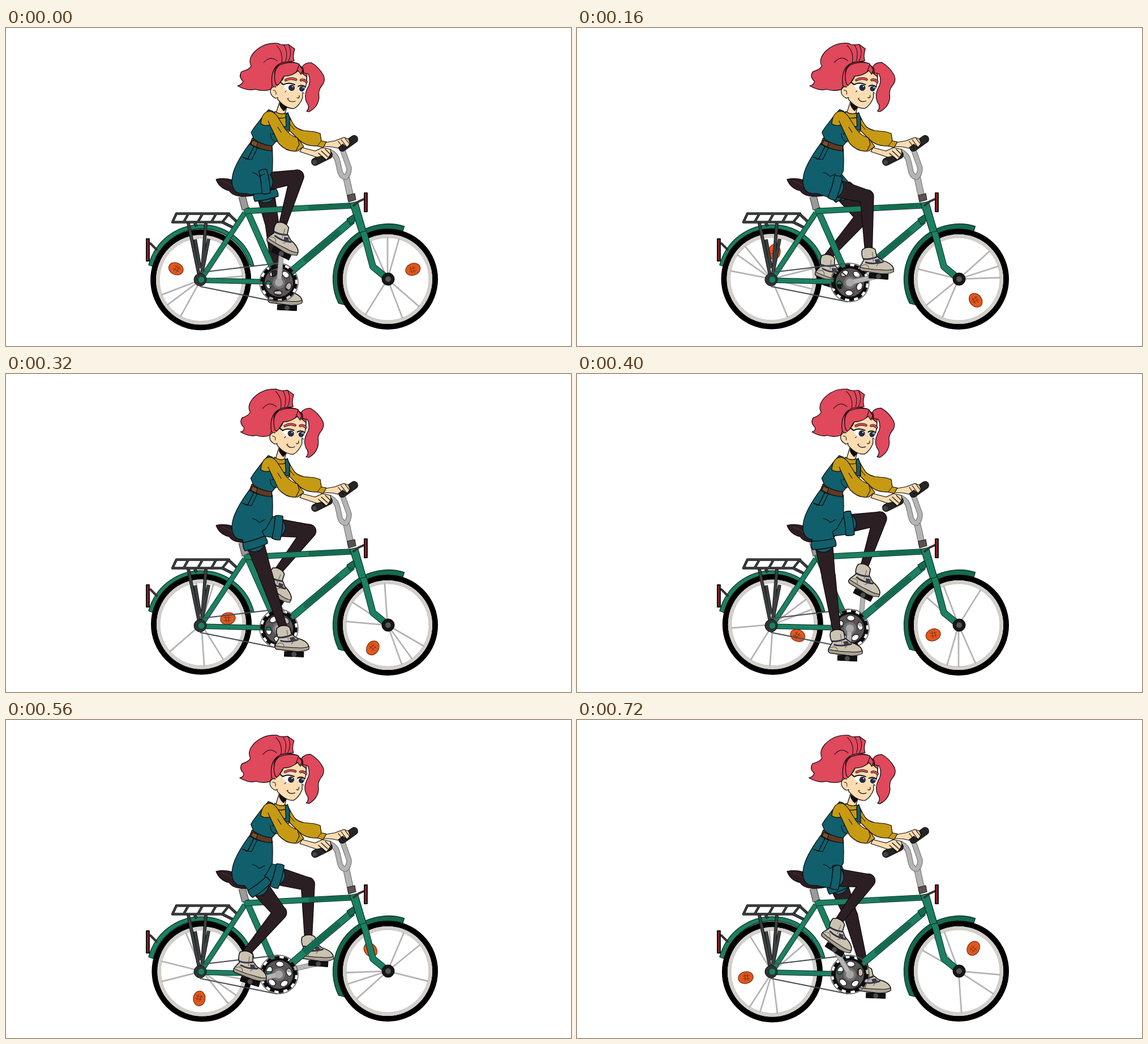
These frames come from a looping animation (998 by 561 pixels, 800 ms). An HTML page with a canvas:

```html
<!DOCTYPE html>
<html lang="en">
<head>
<meta charset="utf-8">
<title>Bike ride</title>
<style>
html, body { margin: 0; width: 100%; height: 100%; overflow: hidden; background: #fff; }
canvas { display: block; width: 100%; height: 100%; }
</style>
</head>
<body>
<canvas id="stage"></canvas>
<script>
const W = 998, H = 561, STEP = 80, STEPS = 10, TAU = Math.PI * 2;
const canvas = document.getElementById('stage');
const g = canvas.getContext('2d');
const INK = '#0c0a0b', GREEN = '#1c8062', DEEP = '#146a50', EDGE = '#0a3024';
const TEAL = '#115f6c', GOLD = '#c79a14', SKIN = '#fcdcb0', HAIR = '#e0485c';
const LEG = '#2b1f24', STEEL = '#b5b4b5', RACK = '#3c4041', SHOE = '#cbc3b1';

// Foot tilt in degrees for each step of the pedal turn
const TILT = [27, 12, 4, 2, 2, 3, 8, 17, 26, 33];
const SPOKES = [-114, -90, -74, 41, 69, 122];

const rad = d => d * Math.PI / 180;
const polar = (x, y, r, d) => [x + r * Math.cos(rad(d)), y + r * Math.sin(rad(d))];

function shape(d, fill, stroke = INK, w = 1.2) {
  const p = typeof d === 'string' ? new Path2D(d) : d;
  if (fill) { g.fillStyle = fill; g.fill(p, 'evenodd'); }
  if (stroke) { g.strokeStyle = stroke; g.lineWidth = w; g.stroke(p); }
}
const line = (d, color = INK, w = 1.2) => shape(d, null, color, w);

// A stroke with a thin outline on both sides
function tube(d, color, w, edge = EDGE, cap = 'butt') {
  g.lineCap = cap;
  line(d, edge, w + 1);
  line(d, color, w - 1);
  g.lineCap = 'round';
}

function disc(x, y, r, fill, stroke = null, w = 1) {
  const p = new Path2D();
  p.arc(x, y, r, 0, TAU);
  shape(p, fill, stroke, w);
}

function at(x, y, deg, draw) {
  g.save();
  g.translate(x, y);
  g.rotate(rad(deg));
  draw();
  g.restore();
}

// Outline all parts first, then fill, so they read as one form
function merge(parts, fill) {
  parts.forEach(p => shape(p, null, INK, 2.4));
  parts.forEach(p => shape(p, fill, null));
}

function limb([x1, y1], [x2, y2], r1, r2) {
  const a = Math.atan2(y2 - y1, x2 - x1), p = new Path2D();
  p.arc(x1, y1, r1, a + Math.PI / 2, a - Math.PI / 2);
  p.arc(x2, y2, r2, a - Math.PI / 2, a + Math.PI / 2);
  p.closePath();
  return p;
}

function wheel(x, y, spin, glow) {
  disc(x, y, 84, null, '#000', 10);
  disc(x, y, 76, null, '#d3cfcb', 6);
  disc(x, y, 73, null, '#bdb9b6', 0.8);
  at(x, y, spin, () => {
    SPOKES.forEach(a => at(0, 0, a, () => line('M8 0H73', '#b4b3b4', 2.7)));
    at(0, 0, glow, () => {
      const p = new Path2D();
      p.ellipse(48, 0, 13.2, 10.4, 0, 0, TAU);
      shape(p, '#e2571d', '#7c3212', 1.2);
      line('M42 -3L53 -1M41 2L52 4M45 -6L44 6M50 -5L48 7', '#6b3218', 0.9);
    });
  });
}

function pedal(x, y, tilt) {
  at(x, y, tilt, () => {
    shape('M-17 -4H17V5H-17Z', '#111', '#000', 1);
    disc(0, 1, 4.5, '#4b4949');
  });
}

function shoe(x, y, tilt) {
  at(x, y, tilt, () => {
    shape('M-32 -44L-26 -48Q-16 -51 -9 -46L-6 -35L4 -28Q21 -24 25 -16L26 -10Q17 -4 5 -4L-31 -7Q-36 -9 -33 -16L-28 -26Q-34 -35 -32 -44Z', SHOE, INK, 1.5);
    shape('M-34 -13Q-15 -10 3 -11Q18 -10 26 -14L26 -9Q17 -4 5 -4L-31 -7Q-35 -9 -34 -13Z', '#aaa194', INK, 1);
    line('M-28 -28Q-19 -27 -6 -33M-24 -22Q-10 -19 6 -25', '#2d3047', 2.8);
    line('M-14 -41L-11 -25M2 -27L-5 -17M-31 -16Q-20 -22 -18 -12', '#5b554f', 1);
    shape('M-9 -28L-1 -30L2 -24L-6 -22Z', '#3b3b48', null);
  });
}

function crank(cx, cy, deg, tilt) {
  const [x, y] = polar(cx, cy, 52, deg);
  tube(`M${cx} ${cy}L${x} ${y}`, STEEL, 8, '#8a898a', 'round');
  pedal(x, y, tilt);
  return [x, y];
}

function pose(hip, [px, py], tilt) {
  const a = rad(tilt), c = Math.cos(a), s = Math.sin(a), thigh = 89, shin = 91;
  const foot = [px - 21 * c + 46 * s, py - 21 * s - 46 * c];
  const dx = foot[0] - hip[0], dy = foot[1] - hip[1];
  const d = Math.min(Math.hypot(dx, dy), thigh + shin);
  const bend = Math.acos((thigh * thigh + d * d - shin * shin) / (2 * thigh * d));
  const turn = (Math.atan2(dy, dx) - bend) * 180 / Math.PI;
  return { hip, foot, turn, knee: polar(...hip, thigh - 6, turn) };
}

function leg(p, pedalAt, tilt) {
  merge([limb(p.hip, p.knee, 17, 11), limb(p.knee, p.foot, 11.5, 6)], LEG);
  shoe(...pedalAt, tilt);
}

function cuff(p, reach) {
  at(...polar(...p.hip, reach, p.turn), p.turn, () =>
    shape('M-7 -20Q0 -23 7 -21Q10 0 7 21Q0 23 -8 20Q-5 0 -7 -20Z', TEAL, INK, 1.4));
}

function rack() {
  tube('M322 344L341 436M353 344L346 436M334 373L343 424M358 372L347 428', RACK, 5, '#151717');
  tube('M301 327.5H394L382 342.5H294ZM322 328L314 342M347 328L339 342M371 328L363 342', RACK, 3.4, '#151717');
  tube('M393 328L408 342M381 342L405 354M333 344L337 350', RACK, 4, '#151717');
  line('M255 380L266 391', '#333', 4);
  shape('M248 372H253V411H248Z', '#861d20', '#151010', 2);
}

function fenders() {
  shape('M252 418A96 96 0 0 1 438 420L430 418A88 88 0 0 0 260 421Z', GREEN, EDGE, 1.3);
  const p = new Path2D();
  p.arc(675, 443, 97.5, rad(154), rad(287));
  p.arc(675, 443, 87, rad(287), rad(148), true);
  p.closePath();
  shape(p, DEEP, EDGE, 1.3);
}

function frame() {
  tube('M417 297L423 320', '#9b9999', 12, '#333');
  tube('M612 339L500 433', GREEN, 12);
  line('M586 361L530 408', DEEP, 9);
  tube('M422 326L344 444', GREEN, 8.5);
  tube('M343 445L470 448', GREEN, 8.5);
  tube('M424 318L472 426', GREEN, 10.5);
  tube('M424 323L616 313', GREEN, 9.5);
  line('M538 317L606 313', DEEP, 7.5);
  tube('M618 322L634 368L648 421L675 443', GREEN, 11);
  shape('M607 309L621 306L636 358L624 361Z', GREEN, EDGE);
  shape('M602 337L614 329L617 340L608 347Z', DEEP, EDGE);
  disc(675, 443, 11, '#161616', '#000');
  disc(675, 443, 5, '#555');
  disc(343, 444, 11, '#303434', '#111');
  disc(345, 444, 6, GREEN, EDGE);
}

function chainring(turn) {
  line('M345 431L480 415M343 456L478 483', '#464b54', 2);
  at(482, 449, turn, () => {
    const p = new Path2D();
    p.arc(0, 0, 27, 0, TAU);
    for (let i = 0; i < 5; i++) {
      const a = 36 + 72 * i, [x, y] = polar(0, 0, 18.5, a);
      p.moveTo(...polar(x, y, 4.8, a));
      p.ellipse(x, y, 4.8, 7, rad(a), 0, TAU);
    }
    shape(p, '#595455', '#151313', 1.2);
    disc(0, 0, 27, null, '#111', 4);
    g.lineCap = 'butt';
    g.setLineDash([8.2, 7]);
    disc(0, 0, 29.3, null, '#0c0c0c', 7);
    g.setLineDash([]);
    g.lineCap = 'round';
  });
  disc(482, 449, 34, null, '#55575c', 1.3);
  disc(482, 449, 11, '#777374');
}

function saddle() {
  shape('M371 267Q384 264 400 268Q433 270 457 279L455 287Q444 298 414 297Q400 296 394 287Q377 283 371 267Z', '#2d1d23');
  line('M382 270Q400 275 406 288', '#54383d', 1);
}

function handlebar() {
  tube('M610 304L600 259', STEEL, 11, '#6d6c6d');
  const fork = 'M572 218Q584 224 586 236L590 254Q593 263 600 263M592 208L606 247Q606 258 600 263';
  tube(fork, STEEL, 8.5, '#6d6c6d', 'round');
  shape('M603 295L616 292L618 303L605 307Z', '#5b514d', '#2a2422');
  line('M632 302L623 306L614 313', '#333', 4);
  shape('M633 291H638V324H633Z', '#8d1b22', '#171011', 2);
  tube('M546 236L570 224M594 211L615 196', '#252525', 13, '#0b0b0b', 'round');
  disc(545, 237, 4, '#444');
}

function torso() {
  shape('M484 128L477 150Q487 155 493 150L497 136Z', SKIN);
  shape('M484 130Q490 139 498 138L491 147Q486 143 483 136Z', INK, null);
  shape('M463 147L475 149Q485 154 498 151L504 163L500 183L474 186L456 172Z', GOLD);
  shape('M475 147Q485 154 495 150L494 158Q482 161 473 156Z', GOLD);
  shape('M452 158L438 176L433 184L437 194L431 205Q450 217 470 215L470 208L485 191L488 180L501 180L502 162L498 149L494 153L495 174L468 173L472 147L464 144Z', TEAL);
  line('M467 186Q468 201 480 201L487 190M470 187L486 182', INK, 1);
  shape('M435 194L431 204Q450 216 470 217L470 208Q450 206 435 194Z', '#5e3a24');
  shape('M436 198L445 202L442 210L433 205Z', '#7a5030', INK, 1);
  line('M438 209L427 231L418 228M444 212L434 232L423 231', INK, 1.1);
}

function arms() {
  shape('M564 202L581 199L597 193L605 196L608 204L602 211L595 205L586 212L577 210L561 209Z', SKIN);
  line('M592 197L602 210M587 200L596 212M599 195L607 205', INK, 1.2);
  shape('M501 159L510 173Q516 179 526 181L545 183L555 186L557 199L566 201L560 211L549 208Q529 209 517 197L501 181Z', GOLD);
  line('M500 168L509 179M557 199L550 208', INK, 1);
  shape('M523 211L546 217L559 211L573 214L574 222L566 233L558 226L549 228L519 218Z', SKIN);
  line('M557 217L568 227M552 221L565 233M564 214L573 223', INK, 1.2);
  shape('M466 147Q452 147 450 169Q458 174 466 171L482 204Q497 220 515 217L526 209L515 194Q502 190 493 178L480 157Q473 147 466 147Z', GOLD);
  line('M515 194L518 205L512 217M466 171L463 164M480 175L486 184', INK, 1.1);
}

function hair(s) {
  const t = 7.5 * s, u = 3 * s;
  shape(`M509 58Q506 50 510 37L499 29Q486 31 480 27Q455 25 438 43Q427 56 433 67Q431 73 ${416 + u} 77Q${410 + u} 86 ${419 + u} 94Q${416 + t} 101 ${409 + t} 102Q${427 + t} 112 ${440 + u} 108Q456 113 468 108Q473 96 471 82Q477 65 489 61Z`, HAIR);
  line('M494 58Q499 43 491 30M487 61Q490 42 478 31M499 58Q506 45 500 31M479 58Q467 47 455 61', INK, 1);
}

function head(s) {
  hair(s);
  shape('M470 101Q467 77 479 66Q493 55 514 62L532 77L531 98L474 106Z', HAIR);
  shape('M480 106Q471 100 467 110Q466 119 476 124L484 122Z', SKIN);
  shape('M479 99Q489 94 491 85Q506 83 517 75L531 86Q532 104 524 112L524 123Q519 136 509 142Q494 143 480 126Z', SKIN);
  shape('M477 103L485 101L488 122L478 122Z', SKIN, null);
  line('M472 110Q478 109 477 117', INK, 1);
  shape('M475 93Q472 73 484 65Q502 58 517 63L524 74L521 82L516 75Q506 85 491 85L483 98Q477 105 475 93Z', HAIR);
  line('M475 82Q473 71 482 65M513 78L518 64', INK, 1.1);
  // Eyes, brows, nose and smile
  shape('M489 100Q499 95 510 100Q513 111 503 112Q493 111 489 100Z', '#fff', null);
  shape('M516 103Q522 99 528 103Q528 113 522 114Q516 113 516 103Z', '#fff', null);
  disc(504.5, 105.5, 5.6, '#282a3d');
  disc(522.5, 107.5, 4.7, '#282a3d');
  disc(506.5, 103.5, 1.1, '#fff');
  disc(524.5, 105.5, 1, '#fff');
  line('M485 96L490 100Q499 95 510 100M516 103Q522 99 529 104', INK, 2);
  line('M495 111L493 113M525 114L527 116', INK, 1);
  line('M494 92Q503 87 512 91M521 92Q526 90 531 95', INK, 4.4);
  line('M494 92Q503 87 512 91M521 92Q526 90 531 95', HAIR, 2.8);
  line('M514 123Q519 125 518 119M498 126Q502 132 511 129M497 125L499 124', INK, 1.2);
  shape(`M523 69Q527 61 539 61Q553 69 561 84Q565 94 557 103Q551 110 553 122Q552 139 ${535 + s} 148L531 147Q538 140 531 131Q526 120 532 107Q540 95 534 81L525 79Z`, HAIR);
  line('M523 69Q527 72 525 81', INK, 1.1);
}

function paint(k) {
  const turn = -85 + 36 * k, sway = (1 - Math.cos(rad(36 * k))) / 2;
  const tilt = TILT[k], farTilt = TILT[(k + 5) % STEPS];
  const wob = 36 * (k - 6.5);
  g.lineCap = g.lineJoin = 'round';

  fenders();
  wheel(...polar(345, 443, 1.5, wob), 233 + 36 * k, -29);
  wheel(674, 443, 36 * k, -21);

  const farPedal = crank(501, 441, turn + 180, farTilt);
  const far = pose([453, 268], farPedal, farTilt);
  leg(far, farPedal, farTilt);

  rack();
  frame();
  chainring(turn);
  saddle();
  merge([limb(far.hip, polar(...far.hip, 22, far.turn), 17, 18)], TEAL);
  cuff(far, 27);

  const nearPedal = crank(482, 449, turn, tilt);
  disc(482, 449, 7, '#a9a7a8');
  const near = pose([432, 275], nearPedal, tilt);
  leg(near, nearPedal, tilt);

  const body = new Path2D('M431 204Q402 243 400 265Q398 283 409 290Q420 293 434 290L459 272L470 252Q471 233 470 214Z');
  merge([body, limb(near.hip, polar(...near.hip, 20, near.turn), 18, 19)], TEAL);
  cuff(near, 25);
  line('M438 209L427 231L418 228M435 255Q442 256 447 262L457 257', INK, 1.1);

  handlebar();
  g.save();
  g.translate(440, 270);
  g.rotate(rad(-0.5 * sway));
  g.translate(-440, -270);
  torso();
  head(sway);
  g.restore();
  arms();
}

let last = '';
function tick(now) {
  const k = Math.floor(now / STEP) % STEPS;
  const dpr = window.devicePixelRatio || 1;
  const w = Math.round(innerWidth * dpr), h = Math.round(innerHeight * dpr);
  const key = [k, w, h].join();
  if (key !== last) {
    last = key;
    if (canvas.width !== w || canvas.height !== h) { canvas.width = w; canvas.height = h; }
    g.setTransform(w / W, 0, 0, h / H, 0, 0);
    g.fillStyle = '#fff';
    g.fillRect(0, 0, W, H);
    paint(k);
  }
  requestAnimationFrame(t => tick(Math.max(0, t - start)));
}
const start = performance.now();
tick(0);
</script>
</body>
</html>
```
